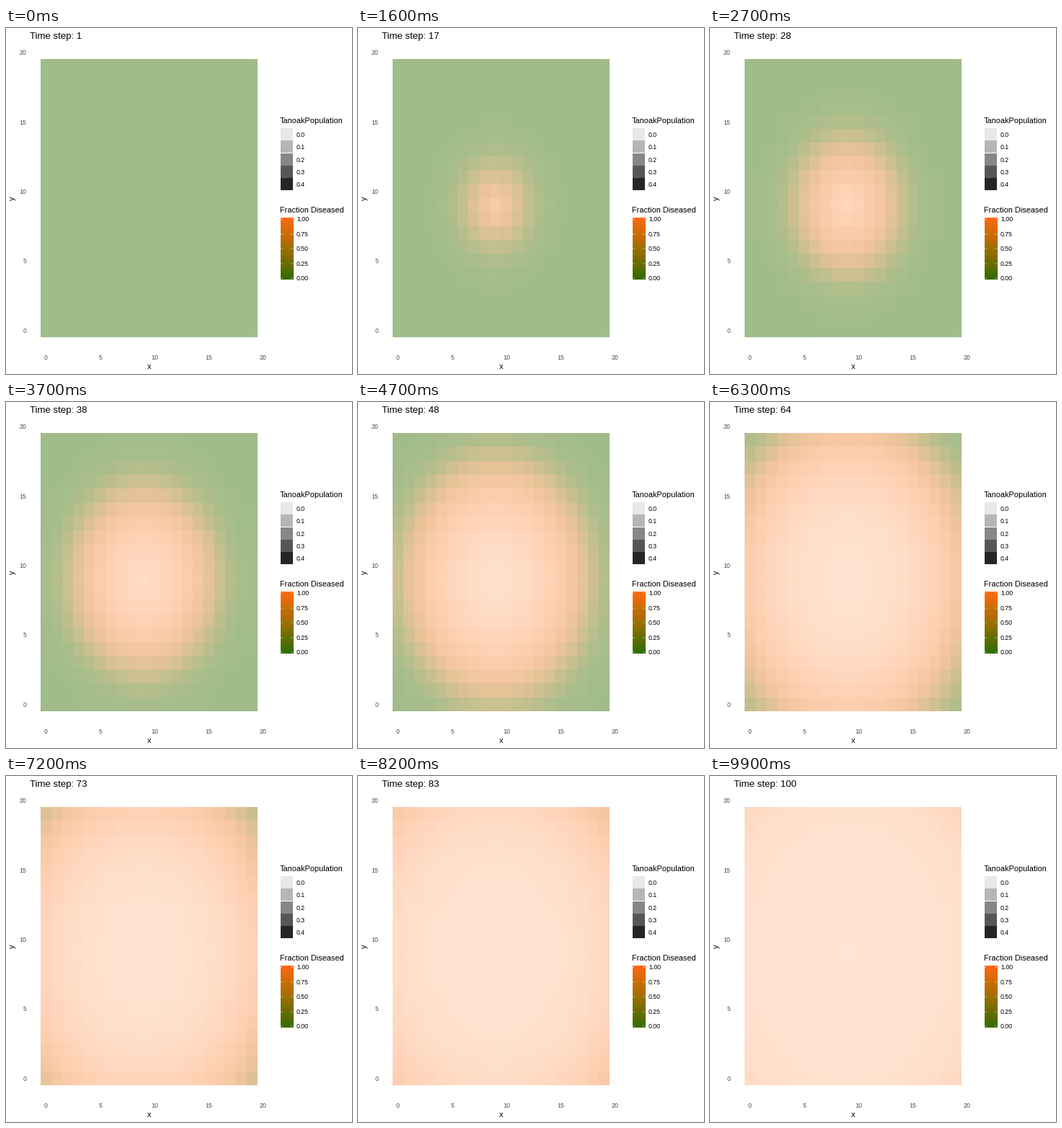
A matplotlib script that plays this animation: 480 px wide and 480 px high, repeating every 10 s.

```python
import numpy as np
import matplotlib.pyplot as plt
from matplotlib.animation import FuncAnimation
from matplotlib.patches import Rectangle

plt.rcParams["font.family"] = "Liberation Sans"

SIZE, DPI = 480, 96
FRAMES, INTERVAL = 100, 100
N = 20
CENTER = 9
STOPS = [0, 0.5, 1]
COLORS = np.array([(46, 108, 0), (158, 110, 0), (255, 106, 13)])

fig = plt.figure(figsize=(SIZE / DPI, SIZE / DPI), dpi=DPI, facecolor="white")
ax = fig.add_axes([0, 0, 1, 1])
ax.axis("off")

rows, cols = np.mgrid[0:N, 0:N]
arrival = 2 + 5 * np.hypot(cols - CENTER, rows - CENTER)


def ramp(f):
    """Green-to-orange colour for a diseased fraction."""
    return np.stack([np.interp(f, STOPS, COLORS[:, c]) for c in range(3)], -1)


def cells(t):
    """Cell colours at time t: infection spreads outwards, then trees die."""
    age = t - arrival
    onset = 1 - np.exp(-t / 6)
    diseased = onset / (1 + np.exp(-(age - 1.5) / 4.5))
    alive = (1 + np.exp((age - 5.5) / 5)) ** (-5 / 19)
    alpha = 0.455 - 0.28 * onset * (1 - alive)
    rgb = 255 + (ramp(diseased) - 255) * alpha[..., None]
    return np.round(rgb).astype(np.uint8)


def label(x, y, s, px=8.8, color="black", **kw):
    return ax.text(x, y, s, fontsize=px * 72 / DPI, color=color,
                   va="baseline", **kw)


def image(data, left, right, bottom, top):
    return ax.imshow(data, extent=(left, right, bottom, top), origin="lower",
                     aspect="auto", interpolation="nearest")


# Heat map and axes
grid = image(cells(0), 48, 349, 429, 43)
title = label(33, 15, "", 13.2)
for v in range(0, 21, 5):
    label(28.5, 423 - 19.3 * v, str(v), color="#4d4d4d", ha="right")
    label(55.5 + 15.05 * v, 460, str(v), color="#4d4d4d", ha="center")
label(198.5, 473, "x", 11, ha="center")
label(13.5, 236, "y", 11, ha="right", rotation=90).set_va("center")

# Population legend
label(380, 132, "TanoakPopulation", 11)
for k, g in enumerate((232, 182, 135, 87, 38)):
    y = 139 + 17.28 * k
    ax.add_patch(Rectangle((381, y), 17, 17, fc=[g / 255] * 3, lw=0))
    label(403, y + 12.2, f"{k / 10:.1f}")

# Disease legend
label(380, 256, "Fraction Diseased", 11)
bar = ramp(np.linspace(0, 1, 86))[:, None]
image(np.round(bar).astype(np.uint8), 380.5, 398, 349, 263)
for k in range(5):
    y = 347 - 20.45 * k
    label(403, y + 3, f"{k / 4:.2f}")
    for x in (380.5, 394.5):
        ax.plot([x, x + 3.5], [y, y], color="white", lw=0.35,
                solid_capstyle="butt")

ax.set_xlim(0, SIZE)
ax.set_ylim(SIZE, 0)


def update(i):
    grid.set_data(cells(i))
    title.set_text(f"Time step: {i + 1}")
    return grid, title


anim = FuncAnimation(fig, update, frames=FRAMES, interval=INTERVAL,
                     repeat=True, repeat_delay=0)
plt.show()
```
